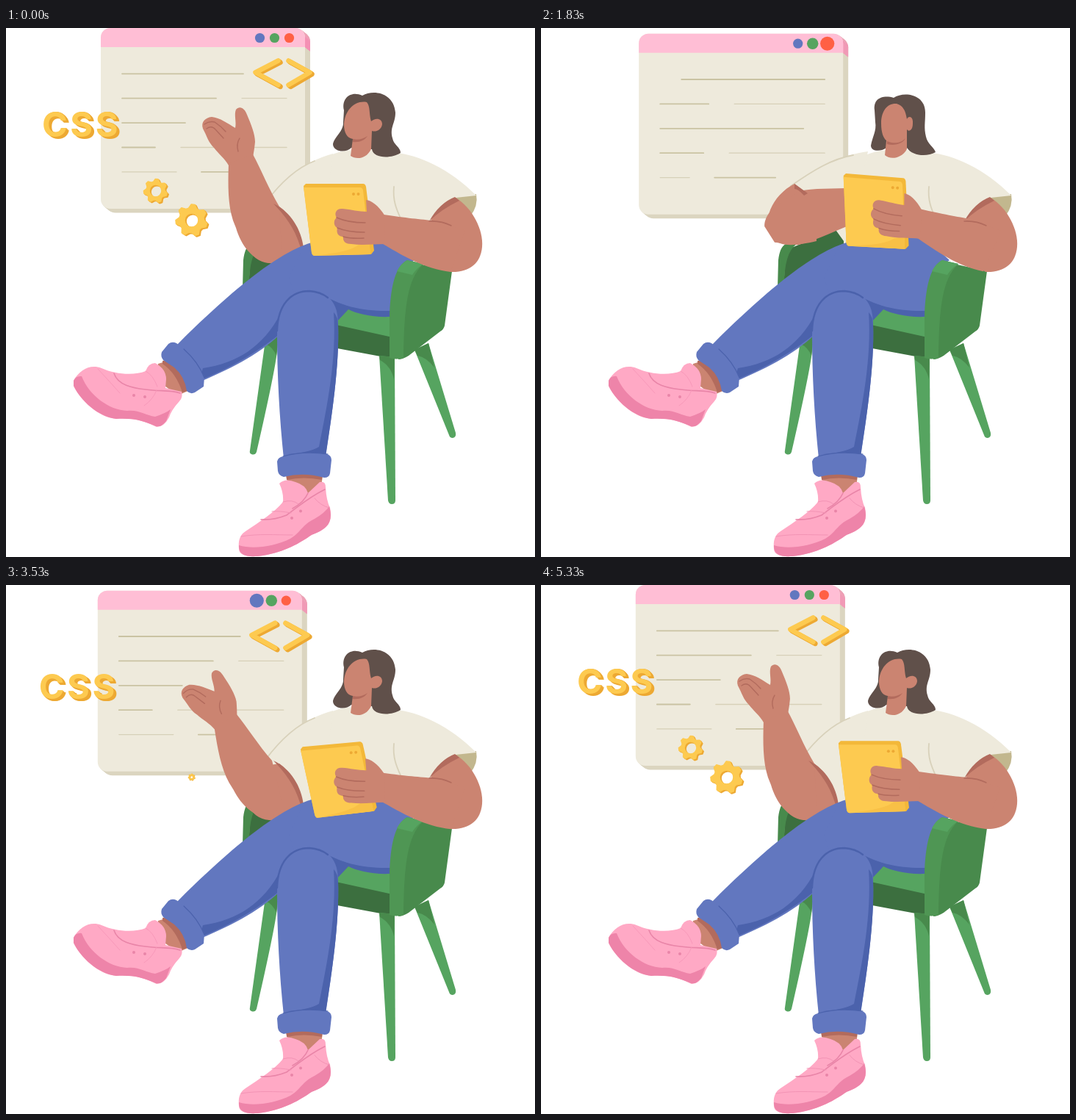
Recreate the animation shown at these times as an HTML page with a canvas. Size 720 by 720 pixels, loop 5.36 s.

```html
<!DOCTYPE html>
<html lang="en">
<head>
<meta charset="utf-8">
<title>Presenting CSS</title>
<style>
html, body { margin: 0; width: 100%; height: 100%; overflow: hidden; background: #fff; }
canvas { display: block; width: 720px; height: 720px; }
</style>
</head>
<body>
<canvas id="stage" width="720" height="720"></canvas>
<script>
const ctx = document.getElementById('stage').getContext('2d');
const LOOP = 5360, TAU = Math.PI * 2, RAD = Math.PI / 180;
const BEATS = [0, 970, 1830, 2370, 3530, 4370];
const ELBOW = [345, 295];
const NUM = /-?[\d.]+/g;

const SKIN = '#cb8471', SKIN_DARK = '#b26b5d', HAIR = '#60504a';
const BLUE = '#6277bf', NAVY = '#4b62ac';
const PINK = '#ffa9c5', SOLE = '#ee84a9', SEAM = '#e985a8';
const CREAM = '#eeeadc', TAN = '#cac3a3', SAND = '#dbd5c0';
const LEAF = '#56a460', GREEN = '#488a4c', FOREST = '#3c6f3f';
const GOLD = '#fdca50', AMBER = '#eda933';

function fill(d, color) {
  ctx.fillStyle = color;
  ctx.fill(new Path2D(d));
}

function line(d, color, width = 1.5) {
  ctx.strokeStyle = color;
  ctx.lineWidth = width;
  ctx.lineCap = ctx.lineJoin = 'round';
  ctx.stroke(new Path2D(d));
}

function dot(x, y, r, color) {
  ctx.fillStyle = color;
  ctx.beginPath();
  ctx.arc(x, y, r, 0, TAU);
  ctx.fill();
}

function group(draw) {
  ctx.save();
  draw();
  ctx.restore();
}

function turnAbout(x, y, angle) {
  ctx.translate(x, y);
  ctx.rotate(angle);
  ctx.translate(-x, -y);
}

function smooth(t, from, to) {
  const u = Math.min(1, Math.max(0, (t - from) / (to - from)));
  return u * u * (3 - 2 * u);
}

const cubicInOut = u => u < 0.5 ? 4 * u ** 3 : 1 - 4 * (1 - u) ** 3;

// Periodic monotone cubic through one value per beat
function along(t, v) {
  const n = v.length;
  const time = i => BEATS[(i + n) % n] + LOOP * Math.floor(i / n);
  const val = i => v[(i + n) % n];
  const rise = i => (val(i + 1) - val(i)) / (time(i + 1) - time(i));
  const slope = i => {
    const a = rise(i - 1), b = rise(i);
    return a * b > 0 ? 2 * a * b / (a + b) : 0;
  };
  let i = n - 1;
  while (t < BEATS[i]) i--;
  const h = time(i + 1) - time(i), u = (t - time(i)) / h, w = 1 - u;
  return w * w * (1 + 2 * u) * val(i) + u * w * w * h * slope(i)
    + u * u * (3 - 2 * u) * val(i + 1) - u * u * w * h * slope(i + 1);
}

// Blend two paths; with a turn, the second is first turned back about the elbow
function mix(a, b, k, turn = 0) {
  const q = b.match(NUM).map(Number);
  const c = Math.cos(turn), s = Math.sin(turn);
  for (let i = 0; turn && i < q.length; i += 2) {
    const x = q[i] - ELBOW[0], y = q[i + 1] - ELBOW[1];
    q[i] = ELBOW[0] + x * c + y * s;
    q[i + 1] = ELBOW[1] - x * s + y * c;
  }
  let i = 0;
  return a.replace(NUM, p => (+p + (q[i++] - p) * k).toFixed(2));
}

function popScale(t, outAt, inAt) {
  const span = 300;
  const u = t < 2000 ? (outAt + span - t) / span : (t - inAt) / span;
  if (u <= 0) return 0;
  if (u >= 1) return 1;
  if (u < 0.6) return 1.17 * Math.sin(u / 0.6 * Math.PI / 2);
  return 1 + 0.17 * (1 + Math.cos((u - 0.6) / 0.4 * Math.PI)) / 2;
}

function pop(x, y, scale, draw) {
  if (scale < 0.01) return;
  group(() => {
    ctx.translate(x, y);
    ctx.scale(scale, scale);
    draw();
  });
}

// Repeats a drawing in the edge colour, then once on top in gold
function extrude(depth, draw) {
  for (let i = depth; i >= 0; i--) group(() => {
    ctx.translate(i, i * 0.8);
    draw(i ? AMBER : GOLD);
  });
}

function panel(x, y, w, h, r, color) {
  ctx.fillStyle = color;
  ctx.beginPath();
  ctx.roundRect(x, y, w, h, r);
  ctx.fill();
}

function rule(x1, x2, y, light) {
  if (x2 > x1) line(`M${x1} ${y} L${x2} ${y}`, light ? '#d6d0b8' : TAN, light ? 1.3 : 1.8);
}

function drawWindow(t) {
  for (let i = 7; i > 0; i--) {
    panel(129 + i, i * 0.8, 278, 246, 13, SAND);
    panel(129 + i, i * 0.8, 278, 26, [13, 13, 0, 0], '#f490b4');
  }
  panel(129, 0, 278, 246, 13, CREAM);
  panel(129, 0, 278, 26, [13, 13, 0, 0], '#ffbed5');

  ['#6277bf', LEAF, '#ff6044'].forEach((color, i) => {
    const away = Math.abs(t % 2680 - (900 + i * 440)) / 850;
    const pulse = away < 1 ? Math.cos(away * Math.PI / 2) ** 2 : 0;
    dot(345.5 + i * 20, 13.5, 6.6 + 3 * pulse, color);
  });

  const row = i => 62.3 + i * 33.4;
  const a = along(t, [286, 275, 224, 256, 286, 286]);
  const b = along(t, [203, 250, 217, 273, 203, 203]);
  const c = along(t, [232, 233, 198, 184, 232, 232]);
  rule(along(t, [158, 158, 187, 282, 158, 158]), along(t, [323, 325, 382, 382, 323, 323]), row(0));
  rule(158, a, row(1));
  rule(a + 35, 382, row(1), true);
  rule(158, along(t, [244, 244, 353, 372, 244, 244]), row(2));
  rule(158, b, row(3));
  rule(b + 35, 382, row(3), true);
  rule(158, c, row(4), true);
  rule(c + 34, 315, row(4));
}

function gear(r, hole) {
  const teeth = 7;
  const shape = new Path2D();
  for (let i = 0; i < teeth * 4; i++) {
    const a = (i + 0.5) / (teeth * 4) * TAU + 0.1;
    const d = i % 4 < 2 ? r : r * 0.78;
    shape.lineTo(Math.cos(a) * d, Math.sin(a) * d);
  }
  shape.closePath();
  shape.moveTo(hole, 0);
  shape.arc(0, 0, hole, 0, TAU);
  extrude(2, color => {
    ctx.fillStyle = ctx.strokeStyle = color;
    ctx.lineWidth = 1.6;
    ctx.lineJoin = 'round';
    ctx.fill(shape, 'evenodd');
    ctx.stroke(shape);
  });
}

function drawIcons(t) {
  pop(102, 131.5, popScale(t, 600, 3240), () => extrude(4, color => {
    ctx.font = '700 47px Inter, Arial, sans-serif';
    ctx.letterSpacing = '3.5px';
    ctx.textAlign = 'center';
    ctx.fillStyle = color;
    ctx.fillText('CSS', 0.5, 16);
  }));
  pop(376.5, 61.5, popScale(t, 750, 3260), () => extrude(3, color => {
    line('M-6 -17 L-37 -1 L-6 16 M8 -17 L37 -1 L8 16', color, 6.5);
  }));
}

function chairBack() {
  fill('M556 438 L575 429 L612 551 Q613 557 608 558 Q604 558 603 554Z', LEAF);
  fill('M556 438 L575 429 L583 462 Q572 448 560 446Z', GREEN);
  fill('M354 418 L371 418 L369 440 Q366 468 341 577 Q339 582 334 580 Q331 579 332 575Z', LEAF);
  fill('M354 418 L371 418 L368 446 Q363 434 353 430Z', GREEN);
  fill('M331 350 Q330 312 341 299 L415 269 L422 300 L345 352Z', FOREST);
  fill('M322 354 L323 316 Q325 298 333 294 L348 294 Q331 306 331 350Z', GREEN);
  fill('M440 406 L468 380 L526 390 L526 424Z', LEAF);
  fill('M440 402 L526 421 L526 450 L440 434Z', FOREST);
  fill('M508 446 L529 448 L530 643 Q530 648 525 648 Q521 648 520 643Z', LEAF);
  fill('M508 446 L529 448 L528 478 Q524 460 509 452Z', GREEN);
}

function chairFront() {
  fill('M545 325 L562 321 L607 331 L597 405 Q596 410 591 413 L548 446 Q540 451 534 451Z', GREEN);
  fill('M522 449 L522 395 C523 352 530 324 546 316 L568 321 C546 342 542 380 541 449 Q531 452 522 449Z', '#4f9654');
  fill('M532 331 Q538 320 546 316 L568 321 Q558 328 553 336Z', LEAF);
}

function sleeve(fold) {
  fill(mix('M445 171 C405 182 378 205 353 238 C360 240 366 241 372 243 C388 255 398 276 404 299 L430 290Z',
    'M445 168 C410 172 375 192 340 215 C346 220 354 226 362 231 C380 231 400 235 414 238 L430 236Z', fold), CREAM);
  line(mix('M420 181 C396 190 374 210 353 238', 'M425 173 C396 178 370 194 340 215', fold), '#d8d1ba', 1.8);
}

function leftArm(t, fold) {
  const bend = 86 * RAD;
  const lean = along(t, [0, 0, -12, -1, -10.5, -8.5]) * RAD;
  group(() => {
    ctx.translate(0, along(t, [0, 0, -6, -1, 0, 0]));
    fill(mix('M404 299 C398 275 388 255 372 243 L330 250 C318 285 330 318 358 320 C375 322 390 312 404 299Z',
      'M375 245 C372 240 368 235 362 231 L345 218 C314 234 299 270 315 292 C325 304 345 303 375 296Z', fold), SKIN);
    group(() => {
      turnAbout(...ELBOW, bend * fold + lean);
      group(() => {
        const size = 1 - 0.55 * fold;
        ctx.translate(320, 178);
        ctx.scale(size, size);
        ctx.translate(-320, -178);
        fill('M303 187 C298 178 290 172 283 163 C275 155 274 148 268 137 C265 128 271 122 280 121 C291 122 302 130 312 136 C314 128 310 118 313 111 C318 105 325 109 328 118 C334 132 339 145 339 155 C338 165 337 170 336 176Z', SKIN);
        line('M270 131 Q277 126 284 128 Q293 134 299 141 M273 137 Q280 132 285 138 L296 150 M318 150 Q313 158 316 168', SKIN_DARK, 1.4);
      });
      fill(mix('M372 243 C358 220 346 190 336 172 L303 184 C302 215 302 240 309 262 L313 272 C320 296 335 316 358 320 L375 300Z',
        'M348 302 C380 301 405 292 440 288 L440 242 C412 238 385 230 364 231 L352 236 C330 242 312 252 309 268 L318 292Z', fold, bend), SKIN);
    });
    ctx.globalAlpha = fold;
    fill('M345 218 L363 231 L358 234 Q350 225 345 225Z', SKIN_DARK);
  });
  group(() => {
    ctx.globalAlpha = 1 - fold;
    fill('M364 239 C388 250 402 275 405 299 L401 299 C394 276 384 260 364 239Z', SKIN_DARK);
  });
}

function shirt() {
  fill('M609 231 L640 226 Q643 242 632 256Z', '#c2b78e');
  fill('M472 166 C440 168 410 186 385 215 L376 240 L412 290 L412 300 L505 300 L580 264 L612 231 L640 228 C605 192 560 172 530 170 L497 166 C490 178 475 178 472 166Z', CREAM);
  line('M528 216 C526 235 532 248 537 259', '#d8d1ba', 1.8);
}

function head(k) {
  fill(mix('M460 112 C456 95 470 85 485 92 C500 83 528 88 530 115 C530 130 522 135 526 150 C528 160 537 162 537 170 C525 178 500 178 498 165 L470 163 C462 171 445 168 445 158 C447 148 460 140 459 128Z',
    'M454 112 C452 95 466 91 480 95 C494 86 523 90 523 115 C523 130 521 135 524 148 C526 158 535 162 537 169 C525 176 505 174 498 163 L470 163 C462 169 449 168 449 160 C451 148 457 140 455 128Z', k), HAIR);
  fill(mix('M460 131 C461 112 475 98 491 101 C496 106 494 118 497 127 C502 122 512 122 512 131 C511 139 503 142 498 140 L497 165 C490 179 476 179 469 174 L472 151 C464 150 460 142 460 131Z',
    'M463 130 C463 112 472 102 484 103 C493 106 496 112 498 124 C500 119 507 120 506 130 C506 139 501 142 498 138 L498 165 C490 179 474 179 468 173 L470 153 C466 150 463 142 463 130Z', k), SKIN);
  fill(mix('M472 151 C479 153 486 151 492 147 C488 153 481 156 472 155Z',
    'M471 154 C480 158 490 157 496 150 C493 157 482 161 471 158Z', k), SKIN_DARK);
}

function swingingLeg(angle) {
  group(() => {
    turnAbout(410, 303, angle);
    fill('M207 457 L230 450 L252 492 L234 500 L206 480Z', SKIN);
    fill('M213 453 L230 450 L250 493 L240 496 Q232 470 213 457Z', SKIN_DARK);
    fill('M92 480 C100 465 115 457 130 463 C150 472 175 473 190 467 Q194 456 203 456 Q218 464 218 478 L217 490 L239 495 Q241 503 236 508 Q225 520 222 530 Q215 543 205 543 C190 536 175 530 150 532 C125 530 100 505 92 487Z', PINK);
    fill('M92 480 Q95 473 103 474 C113 500 140 520 165 521 C180 519 190 527 203 529 Q218 524 224 519 L218 535 Q211 544 204 542 C185 534 175 531 150 532 C120 528 98 500 92 487Z', SOLE);
    line('M147 470 C152 486 172 490 190 492 C210 495 222 492 237 497', SEAM, 1.6);
    line('M125 464 Q140 480 155 497 M190 467 Q200 472 206 488 M205 493 Q200 506 188 514', '#f697b8', 0.9);
    dot(174, 500, 2, SEAM);
    dot(189, 502, 2, SEAM);
    fill('M420 291 C370 303 298 366 233 431 L265 481 C310 462 350 441 378 412 L440 384 L470 300Z', BLUE);
    fill('M268 463 C315 456 350 434 374 388 L378 412 C345 440 305 463 263 480Z', NAVY);
    fill('M212 441 L221 430 Q226 426 232 429 L243 437 Q262 455 270 475 L269 488 L257 496 Q251 499 246 494 Q243 474 229 462 L214 452 Q210 447 212 441Z', BLUE);
    line('M242 437 Q262 455 270 476', NAVY, 1.2);
  });
}

function hips() {
  fill('M405 298 C440 286 470 284 505 280 L525 288 L556 316 Q527 335 524 393 Q490 391 458 380 L400 384 L385 340Z', BLUE);
  fill('M425 359 C455 380 490 386 524 385 L523 393 C498 394 478 389 466 383 L450 400Z', NAVY);
}

function standingLeg() {
  fill('M381 608 L431 608 L429 626 L410 636 L384 622Z', SKIN);
  fill('M381 606 L431 606 L430 615 Q405 610 382 615Z', SKIN_DARK);
  fill('M372 620 Q380 612 394 618 Q408 622 411 633 L427 618 Q435 616 435 625 Q436 643 441 653 C445 675 437 682 415 690 C400 701 380 713 350 718 C330 721 317 718 317 709 C316 698 318 690 326 685 C345 672 365 660 377 645 Q378 632 372 620Z', PINK);
  fill('M317 704 C335 710 365 706 387 695 C400 688 404 675 420 668 Q434 660 440 651 C446 672 438 682 416 690 C400 701 380 713 350 718 C330 721 316 719 317 704Z', SOLE);
  line('M347 669 Q365 670 382 663 C400 650 410 640 434 628 M411 633 Q406 645 390 654', SEAM, 1.6);
  line('M320 692 C345 688 365 690 390 690 M362 658 Q372 657 388 660 M377 645 Q390 641 398 648 M420 640 Q428 650 440 653', '#f394b5', 1);
  dot(389, 667, 2, SEAM);
  dot(401, 657.5, 2, SEAM);
  fill('M369 420 C369 376 388 357 413 357 C440 359 452 375 452 402 C454 460 443 530 435 584 L378 586 C372 530 369 470 369 420Z', BLUE);
  fill('M446 387 Q452 393 452 405 C454 460 443 530 435 582 L384 580 Q412 578 426 570 C438 510 450 450 446 387Z', NAVY);
  line('M369 412 C370 376 388 358 413 358 Q428 359 438 367', NAVY, 2.4);
  fill('M369 590 Q370 584 378 583 Q405 575 437 580 Q443 582 443 588 L441 606 Q440 612 433 612 Q405 604 378 611 Q371 609 370 603Z', BLUE);
  line('M377 583 Q405 575 438 580', NAVY, 1.2);
}

function tablet(t) {
  group(() => {
    ctx.translate(along(t, [453, 455, 456, 455.5, 453, 452]), along(t, [261, 255, 250.5, 251, 265, 269]));
    ctx.rotate(along(t, [0, 3, 4.5, 4.1, -5.3, -5.3]) * RAD);
    fill('M-48 -46 L-45 -49 L33 -49 Q36 -49 37 -45 L48 42 L44 47 L-33 49 Q-36 49 -37 45Z', '#f3b839');
    fill('M-48 -44 L29 -44 Q32 -44 33 -40 L43 47 L-33 49 Q-36 49 -37 45Z', GOLD);
    fill('M43 47 L-28 48 Q15 44 27 34 L41 30Z', '#f8c046');
    dot(20, -35, 2, AMBER);
    dot(26.5, -35, 2, AMBER);
  });
}

function rightArm(t) {
  fill('M577 264 Q590 240 612 231 C635 245 650 275 648 298 C646 321 630 333 605 332 L570 310Z', SKIN);
  fill('M576 263 Q590 238 611 230 L617 235 Q592 247 576 263Z', SKIN_DARK);
  group(() => {
    turnAbout(615, 290, along(t, [0, 0.041, 0.074, 0.07, -0.018, -0.036]));
    fill('M508 253 C540 258 560 260 580 262 L625 275 L605 332 C570 328 540 310 508 291Z', SKIN);
    fill('M516 256 C506 240 497 235 490 234 L491 250 C480 250 470 247 458 246 C450 245 446 252 450 258 C445 262 446 270 451 272 C449 280 453 284 459 284 C458 291 463 294 470 294 C485 296 500 294 516 294Z', SKIN);
    line('M450 258 Q465 265 489 265 M451 272 Q465 278 488 278 M459 284 Q470 287 487 286', SKIN_DARK, 1.5);
  });
  line('M576 263 Q592 262 606 269', SKIN_DARK, 1.5);
}

function draw(t) {
  const phase = t / LOOP * TAU;
  const fold = smooth(t, 300, 930) - smooth(t, 2450, 3350);
  const face = smooth(t, 350, 900) - smooth(t, 2500, 3300) + along(t, [0, 0, 0, 0, 0, 0.3]);
  const swing = t * 3 / LOOP % 1;
  ctx.clearRect(0, 0, 720, 720);
  group(() => {
    ctx.translate(5 * Math.sin(phase), 5 - 5 * Math.cos(phase));
    drawWindow(t);
    drawIcons(t);
  });
  pop(203.5, 221.5, popScale(t, 480, 3580), () => gear(16, 8.5));
  pop(252.5, 261.5, popScale(t, 400, 3510), () => gear(21.5, 9.5));
  chairBack();
  shirt();
  head(face);
  sleeve(fold);
  leftArm(t, fold);
  swingingLeg(0.088 * cubicInOut(1 - Math.abs(1 - 2 * swing)));
  hips();
  standingLeg();
  chairFront();
  tablet(t);
  rightArm(t);
}

function tick(now) {
  draw(now % LOOP);
  requestAnimationFrame(tick);
}
draw(0);
requestAnimationFrame(tick);
</script>
</body>
</html>
```
